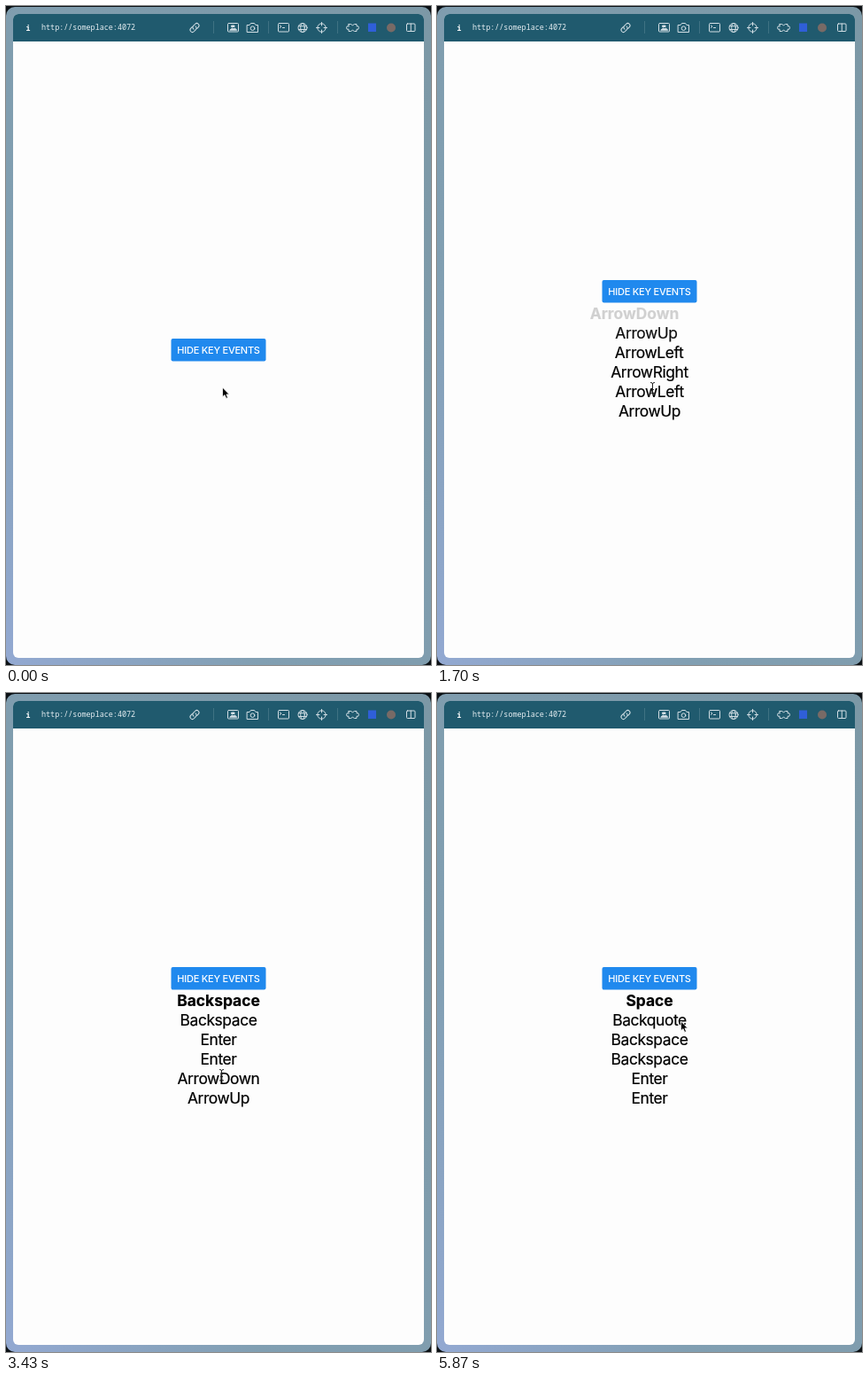
Write an HTML page that moves like this. It is 480 px wide and 743 px high and loops after 5900 ms.

```html
<!DOCTYPE html>
<html lang="en">
<head>
<meta charset="utf-8">
<title>Key events</title>
<style>
  html, body { margin: 0; width: 100%; height: 100%; overflow: hidden; background: #0b1014; }
  svg { display: block; width: 100%; height: 100%; }
  text { font-family: Inter, "Liberation Sans", sans-serif; }
  .mono { font: 500 8.43px "Noto Sans Mono", "DejaVu Sans Mono", monospace; fill: #e6eef2; }
  .icons { fill: none; stroke: #d3dfe5; stroke-linecap: round; stroke-linejoin: round; }
  .label { font-size: 11px; font-weight: 500; letter-spacing: -.25px; fill: #fff; text-anchor: middle; }
  .row { font-size: 17.4px; letter-spacing: -.4px; text-anchor: middle; stroke: #000; stroke-width: .2; }
  .row.latest { font-weight: 700; letter-spacing: 0; }
</style>
</head>
<body>
<svg viewBox="0 0 480 743">
  <linearGradient id="edge" x1="1" y1="0" x2="0" y2="1">
    <stop offset="0" stop-color="#7c98a6"/>
    <stop offset=".7" stop-color="#819fb2"/>
    <stop offset="1" stop-color="#93a9d2"/>
  </linearGradient>
  <rect y="1" width="480" height="742" rx="10" fill="url(#edge)"/>
  <rect x="8" y="9" width="464" height="726" rx="6" fill="#fdfdfd"/>
  <path d="M8 40V15a6 6 0 0 1 6-6H466a6 6 0 0 1 6 6V40Z" fill="#205a6e"/>

  <text class="mono" x="22.4" y="27.5" style="font-weight:700;fill:#fff">i</text>
  <text class="mono" x="40" y="27">http://someplace:4072</text>

  <path d="M234.5 17V31M296.5 17V31M374.5 17V31" stroke="#3f7283"/>
  <g class="icons">
    <g transform="translate(213 24.5) rotate(-45)">
      <path d="M-1 -2.5H-3.5a2.5 2.5 0 0 0 0 5H-.5a2.5 2.5 0 0 0 2.4 -3"/>
      <path d="M1 2.5H3.5a2.5 2.5 0 0 0 0 -5H.5a2.5 2.5 0 0 0 -2.4 3"/>
    </g>
    <rect x="250.5" y="19.5" width="12" height="9.5" rx="1"/>
    <path d="M253 27l2.5-2 1.5 1 1.5-1 2 2ZM255 22h3v1.5h-3Z" fill="#d3dfe5"/>
    <path d="M272.5 21.5h2.5l1.5-2h4l1.5 2h2.5v8h-12Z"/>
    <circle cx="278.5" cy="25.2" r="2.3"/>
    <rect x="307.5" y="19.5" width="12" height="9.5" rx="1"/>
    <path d="M309.500 22l1.5 1.2-1.5 1.2M312.500 24.5h2"/>
    <circle cx="335" cy="24.5" r="5"/>
    <ellipse cx="335" cy="24.5" rx="2.3" ry="5"/>
    <path d="M330.5 22.7h9M330.5 26.5h9"/>
    <circle cx="356.5" cy="24.5" r="4.7"/>
    <path d="M356.5 18.5v3.5M356.5 27v3.5M350.5 24.5h3.5M359 24.5h3.5"/>
    <path d="M387 20.5h2.5q2 2.500 4 0h2.500v2.300q2.500-.8 2.500 1.700t-2.500 1.700v2.300h-2.500q-2-2.500-4 0h-2.500v-2.300q-2.500.8-2.500-1.700t2.500-1.700Z"/>
    <rect x="452.5" y="20" width="9.5" height="8.5" rx="1"/>
    <path d="M457.25 20v8.5"/>
  </g>
  <rect x="409" y="19.5" width="9" height="9.5" fill="#2f5fd8"/>
  <circle cx="435" cy="24.5" r="5" fill="#786a66"/>

  <g id="button">
    <rect x="186.5" width="107" height="25.5" rx="2" fill="#2089ee"/>
    <text class="label" x="240" y="16.7">HIDE KEY EVENTS</text>
  </g>
  <g id="rows"></g>

  <path id="arrow" d="M0 0V10.8L2.5 8.6 4.2 12.4 6 11.6 4.4 7.9H7.7Z" stroke="#fff" stroke-width=".8"/>
  <path id="beam" d="M-2.5 -6Q0 -6 0 -4.5Q0 -6 2.5 -6M0 -4.5V5M-2.5 6.5Q0 6.5 0 5Q0 6.5 2.5 6.5M-1.5 2H1.5" fill="none" stroke="#222"/>
</svg>

<script>
const LOOP = 5900, FADE = 500, MAX_ROWS = 6, ROW = 22;

const presses = [
  [500, "ArrowDown"], [660, "ArrowUp"], [820, "ArrowLeft"], [978, "ArrowRight"],
  [1300, "ArrowLeft"], [1440, "ArrowUp"], [1635, "ArrowDown"],
  [2040, "Enter"], [2200, "Enter"], [2680, "Backspace"], [2860, "Backspace"],
  [3700, "Backquote"], [4800, "Space"]
];
const beamFrom = 820, moveFrom = 5430, moveTo = 5870;

const get = id => document.getElementById(id);
const clamp = v => Math.min(1, Math.max(0, v));
const place = (el, x, y) => el.setAttribute("transform", `translate(${x} ${y})`);

// The CSS "ease" curve, solved by bisection
function ease(x) {
  if (x <= 0 || x >= 1) return clamp(x);
  const bezier = (s, a, b) => 3 * s * (1 - s) ** 2 * a + 3 * s * s * (1 - s) * b + s ** 3;
  let low = 0, high = 1;
  for (let i = 0; i < 20; i++) {
    const mid = (low + high) / 2;
    if (bezier(mid, .25, .25) < x) low = mid; else high = mid;
  }
  return bezier(low, .1, 1);
}

const rows = Array.from({ length: MAX_ROWS }, (_, i) => {
  const row = document.createElementNS("http://www.w3.org/2000/svg", "text");
  row.setAttribute("class", i ? "row" : "row latest");
  return get("rows").appendChild(row);
});

function drawList(t) {
  const shown = presses.filter(([at]) => at <= t).reverse().slice(0, MAX_ROWS);
  const top = 375 - shown.length * ROW / 2;
  place(get("button"), 0, top);
  rows.forEach((row, i) => {
    const [at, name] = shown[i] || [0, ""];
    const p = ease((t - at) / FADE);
    if (row.textContent !== name) row.textContent = name;
    row.setAttribute("opacity", clamp(p * 1.15));
    place(row, 240 - 20 * (1 - p), top + 43.5 + i * ROW);
  });
}

function drawPointer(t) {
  const p = ease((t - moveFrom) / (moveTo - moveFrom));
  const overText = t >= beamFrom && t < moveFrom;
  get("arrow").style.display = overText ? "none" : "";
  get("beam").style.display = overText ? "" : "none";
  place(get("arrow"), 244.5 + 31 * p, 430 - 60 * p);
  place(get("beam"), 243.5, 430.5);
}

const start = performance.now();
function frame(now) {
  const t = Math.max(0, now - start) % LOOP;
  drawList(t);
  drawPointer(t);
  requestAnimationFrame(frame);
}
frame(start);
</script>
</body>
</html>
```
